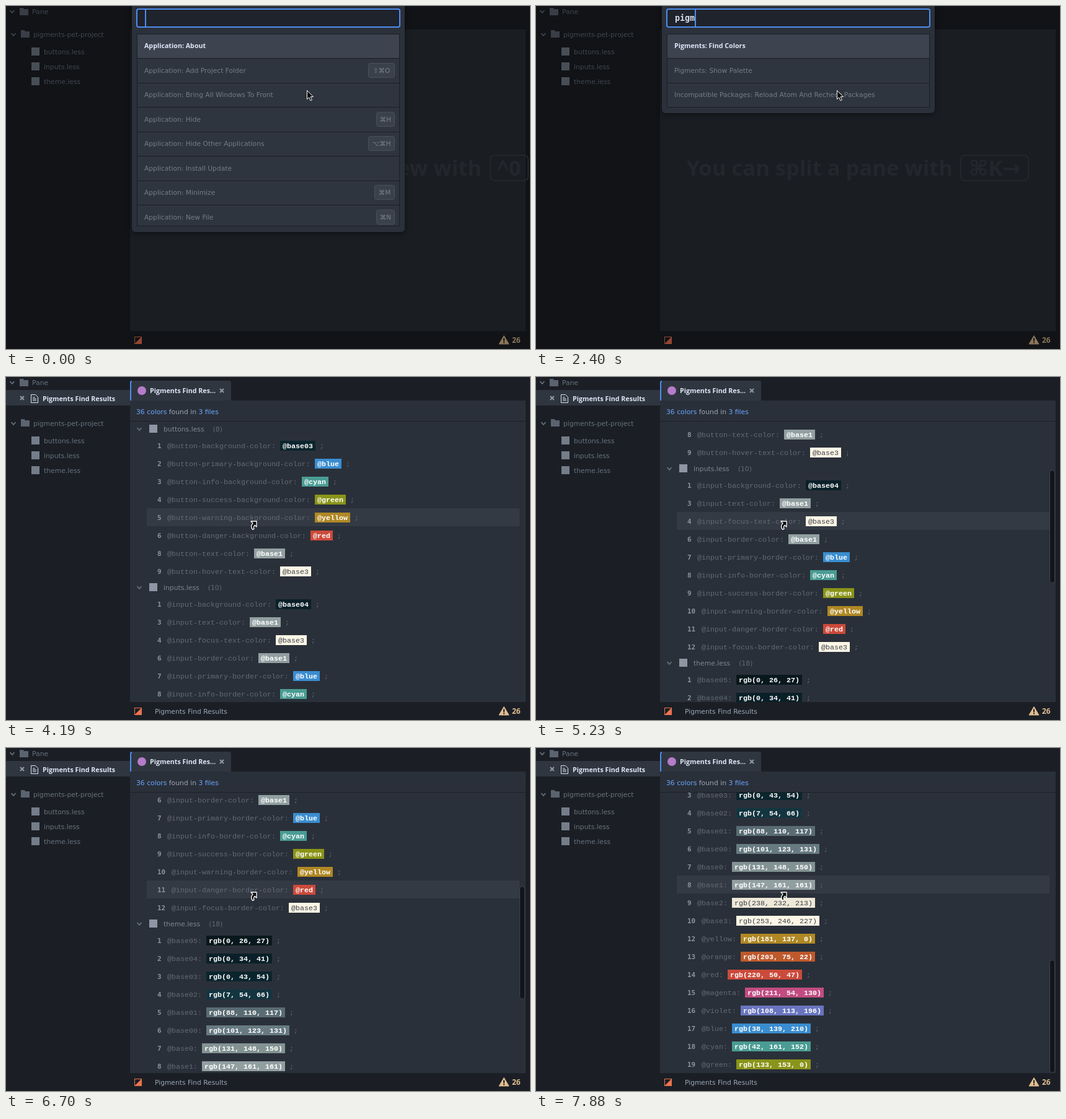
An HTML page for the animation above (8000 ms loop, 845 by 554 pixels).

```html
<!DOCTYPE html>
<html lang="en">
<head>
<meta charset="utf-8">
<title>Find colors</title>
<style>
  html, body { margin: 0; width: 100%; height: 100%; overflow: hidden; background: #1b1f25; }
  svg { display: block; width: 845px; height: 554px; }
  text { font: 10.8px "DejaVu Sans", sans-serif; fill: #68717e; white-space: pre; }
  .bold { font: 700 10.7px "Open Sans", sans-serif; fill: #dfe6f5; }
  .code { font: 11.67px "Liberation Mono", monospace; fill: #626a76; }
  .pill { font-weight: 700; }
  .num { font: 700 11px "DejaVu Sans Mono", monospace; fill: #8a93a0; }
  .link { fill: #6aa5ff; }
  .soft { fill: #9ba6b6; }
  .item { font-size: 10.7px; fill: #737c89; }
  .key { font-size: 10.5px; fill: #79828f; text-anchor: middle; }
  .query { font: 700 13.3px "DejaVu Sans Mono", monospace; fill: #d5dcea; }
  .tip { font: 700 34.5px "Open Sans", "DejaVu Sans", sans-serif; fill: #383e47; }
</style>
</head>
<body>
<svg id="stage" viewBox="0 0 845 554"></svg>
<script>
const LOOP = 8000;
const stage = document.getElementById('stage');

function add(parent, tag, attrs = {}, content) {
  const node = document.createElementNS('http://www.w3.org/2000/svg', tag);
  for (const key in attrs) node.setAttribute(key, attrs[key]);
  if (content !== undefined) node.textContent = content;
  parent.append(node);
  return node;
}
const group = (parent, attrs) => add(parent, 'g', attrs);
const rect = (parent, x, y, width, height, fill, more) =>
  add(parent, 'rect', { x, y, width, height, fill, ...more });
const text = (parent, x, y, content, cls = '', more) =>
  add(parent, 'text', { x, y, class: cls, ...more }, content);
const line = (parent, d, stroke, width = 1.5) =>
  add(parent, 'path', { d, stroke, 'stroke-width': width, fill: 'none' });
const show = (node, on) => node.setAttribute('display', on ? 'inline' : 'none');

function clip(id, x, y, w, h) {
  rect(add(stage, 'clipPath', { id }), x, y, w, h);
  return { 'clip-path': `url(#${id})` };
}
const chevron = (parent, x, y) =>
  line(parent, `M${x - 3.5} ${y - 2}l3.5 4 3.5-4`, '#68717e', 1.8);
const cross = (parent, x, y) =>
  line(parent, `M${x - 3} ${y - 3}l6 6m0-6l-6 6`, '#9199a5', 2);
const folder = (parent, x, y) =>
  add(parent, 'path', { d: `M${x} ${y - 6}h6l1 2h7v10h-14z`, fill: '#5b636f' });

// Window
rect(stage, 0, 0, 845, 554, '#1b1f25');
rect(stage, 200, 38, 638, 487, '#2a3039');

// Background tips
function tip(words, right, keyX, keyWidth, keys) {
  const g = group(stage);
  text(g, right, 274, words, 'tip', { 'text-anchor': 'end' });
  rect(g, keyX + 1, 241, keyWidth - 2, 41, 'none',
    { rx: 7, stroke: '#383e47', 'stroke-width': 2 });
  text(g, keyX + keyWidth / 2, 274, keys, 'tip', { 'text-anchor': 'middle' });
  return g;
}
const tipTree = tip('You can focus the tree view with', 767, 780, 63, '^0');
const tipSplit = tip('You can split a pane with', 672, 684, 111, '⌘K→');

// Sidebar
chevron(stage, 10, 9);
folder(stage, 22, 9);
text(stage, 42, 13, 'Pane');
const project = group(stage);
chevron(project, 12, 46);
folder(project, 24, 45);
text(project, 44, 50, 'pigments-pet-project');
['buttons', 'inputs', 'theme'].forEach((name, i) => {
  const y = 74 + 24 * i;
  rect(project, 41, y - 7, 13, 13, '#747d89');
  text(project, 61, y + 4, name + '.less');
});

// Status bar
rect(stage, 207.5, 534.5, 11, 11, 'none', { stroke: '#ee7350' });
add(stage, 'path', { d: 'M219 534v12h-12z', fill: '#ee7350' });
add(stage, 'path', { d: 'M803 532.5l8 13.5h-16z', fill: '#e0bd91', stroke: '#e0bd91', 'stroke-linejoin': 'round' });
line(stage, 'M803 536.5v5m0 1v2', '#1b1f25', 2);
text(stage, 816, 544, '26', 'bold', { style: 'fill:#e0bd91;font-size:12px' });

// Results pane
const pane = group(stage);
rect(pane, 0, 21, 200, 25, '#303640');
cross(pane, 26, 34);
line(pane, 'M40.5 28.5h7l4 4v9h-11z M43 33h4m-4 2.5h6m-6 2.5h6', '#dfe6f5', 1);
text(pane, 59, 39, 'Pigments Find Results', 'bold');
add(pane, 'path', { d: 'M200 38V9q0-3 3-3h157q3 0 3 3v29z', fill: '#303640' });
line(pane, 'M201 38V9q0-2 2-2', '#4d8df2', 2);
add(pane, 'circle', { cx: 219, cy: 22, r: 7, fill: '#b57cc9' });
text(pane, 232, 26, 'Pigments Find Res…', 'bold');
cross(pane, 348, 22);
rect(pane, 200, 38, 638, 487, '#2a3039');
const summary = text(pane, 210, 60, '');
[['36 colors', 'link'], [' found in ', 'soft'], ['3 files', 'link']]
  .forEach(([part, cls]) => add(summary, 'tspan', { class: cls }, part));
rect(pane, 200, 71, 638, 1, '#1b1f25');
text(pane, 240, 544, 'Pigments Find Results', 'soft', { style: 'font-size:10.7px' });

const colors = {
  base05: '#09181d', base04: '#0a2029', base03: '#0a252e', base02: '#133540',
  base01: '#5a6c73', base00: '#677a82', base0: '#839393', base1: '#929fa1',
  base2: '#eee8d8', base3: '#fdf6e6', yellow: '#b08824', orange: '#be592c',
  red: '#cc4a3b', magenta: '#c24c82', violet: '#6975bf', blue: '#3a8dd0',
  cyan: '#4a9c94', green: '#8a9419'
};
// Each row: line number, variable, value, color name
const statuses = suffix => ['primary blue', 'info cyan', 'success green', 'warning yellow', 'danger red']
  .map(pair => pair.split(' ')).map(([kind, color]) => [kind + suffix, color]);
const numbered = (lines, prefix, rows) =>
  rows.map(([name, color], i) => [lines[i], prefix + name, '@' + color, color]);
const themeValues = ['0, 26, 27', '0, 34, 41', '0, 43, 54', '7, 54, 66', '88, 110, 117',
  '101, 123, 131', '131, 148, 150', '147, 161, 161', '238, 232, 213', '253, 246, 227',
  '181, 137, 0', '203, 75, 22', '220, 50, 47', '211, 54, 130', '108, 113, 196',
  '38, 139, 210', '42, 161, 152', '133, 153, 0'];
const files = [
  ['buttons', 84, numbered([1, 2, 3, 4, 5, 6, 8, 9], 'button-', [
    ['background-color', 'base03'], ...statuses('-background-color'),
    ['text-color', 'base1'], ['hover-text-color', 'base3']])],
  ['inputs', 340, numbered([1, 3, 4, 6, 7, 8, 9, 10, 11, 12], 'input-', [
    ['background-color', 'base04'], ['text-color', 'base1'], ['focus-text-color', 'base3'],
    ['border-color', 'base1'], ...statuses('-border-color'), ['focus-border-color', 'base3']])],
  ['theme', 654, Object.keys(colors).map((name, i) =>
    [i < 10 ? i + 1 : i + 2, name, `rgb(${themeValues[i]})`, name])]
];

const view = group(pane, clip('view', 200, 72, 638, 453));
const results = group(view);
const hover = rect(results, 227, 0, 601, 29, '#343a44');
const rowCenters = [];
const CHAR = 7;

function resultRow(y, [number, name, value, color]) {
  rowCenters.push(y);
  const codeX = 253 + CHAR * String(number).length;
  const pillX = codeX + CHAR * (name.length + 3);
  const pillWidth = CHAR * value.length + 8;
  const light = color === 'base2' || color === 'base3';
  const baseline = y + 4;
  text(results, 244, baseline, number, 'num');
  text(results, codeX, baseline, `@${name}:`, 'code');
  rect(results, pillX, y - 8, pillWidth, 16, colors[color]);
  text(results, pillX + 4, baseline, value, light ? 'code' : 'code pill',
    { style: `fill:${light ? '#3b4048' : '#fff'}` });
  text(results, pillX + pillWidth + CHAR, baseline, ';', 'code');
}
for (const [name, y, rows] of files) {
  chevron(results, 215, y);
  rect(results, 231, y - 7, 13, 13, '#8d96a2');
  const title = text(results, 254, y + 4, name + '.less', '', { style: 'fill:#7d8692' });
  add(title, 'tspan', { dx: 14, fill: '#626a76' }, `(${rows.length})`);
  rows.forEach((row, i) => resultRow(y + 27 + 29 * i, row));
}
const thumb = rect(pane, 828.5, 72, 8, 182, '#12161b', { rx: 4, stroke: '#3d444e' });

// Command palette
const palette = group(stage);
rect(palette, 0, 0, 845, 554, '#000', { opacity: .38 });
const panel = rect(palette, 203, -10, 440, 375, '#2b313a',
  { rx: 6, style: 'filter:drop-shadow(0 2px 5px rgba(0,0,0,.5))' });
rect(palette, 211, 5, 424, 29, '#1f232b', { rx: 3, stroke: '#4d8df2', 'stroke-width': 2 });
const query = text(palette, 224, 24, '', 'query');
const caret = rect(palette, 224, 6, 2, 27, '#4d8df2');

function commandList(id, height, rows) {
  const g = group(palette, clip(id, 211, 45, 424, height));
  rows.forEach(([label, keys], i) => {
    const y = 45 + 39.5 * i, top = Math.floor(y), mid = Math.round(y + 19.4);
    rect(g, 211, top, 424, 40, i ? '#2f353f' : '#3d4450');
    rect(g, 211, top, 424, 1, '#1b1f25');
    text(g, 223, mid + 4, label, i ? 'item' : 'bold');
    if (!keys) return;
    const width = keys.length > 2 ? 43 : keys.endsWith('M') ? 33 : 30;
    rect(g, 627.5 - width, mid - 11.5, width - 1, 23, '#3a414b', { rx: 3, stroke: '#4a515c' });
    text(g, 627 - width / 2, mid + 4, keys, 'key');
  });
  rect(g, 211.5, 45.5, 423, height - 1, 'none', { stroke: '#1b1f25' });
  return { g, bottom: 54 + height };
}
const pigments = [['Pigments: Find Colors'], ['Pigments: Show Palette']];
const application = (label, keys) => ['Application: ' + label, keys];
const lists = {
  all: commandList('all', 311, [
    application('About'),
    application('Add Project Folder', '⇧⌘O'),
    application('Bring All Windows To Front'),
    application('Hide', '⌘H'),
    application('Hide Other Applications', '⌥⌘H'),
    application('Install Update'),
    application('Minimize', '⌘M'),
    application('New File', '⌘N')]),
  some: commandList('some', 311, [
    ...pigments,
    application('Add Project Folder', '⇧⌘O'),
    application('Bring All Windows To Front'),
    application('Hide', '⌘H'),
    application('Hide Other Applications', '⌥⌘H'),
    application('Install Update'),
    application('Minimize', '⌘M')]),
  few: commandList('few', 119, [
    ...pigments, ['Incompatible Packages: Reload Atom And Recheck Packages']])
};

// Pointers
const outline = { fill: '#000', stroke: '#fff', 'stroke-linejoin': 'round' };
const arrow = add(stage, 'path',
  { ...outline, d: 'M.5 .5v14l3.2-3 2.3 5.3 2.4-1-2.3-5.2h4.4z' });
const alias = add(stage, 'path', { ...outline, 'stroke-width': 1.3,
  d: 'M395 233h9v9l-2.8-2.8q-3 2.5-1.2 6.2l-2.4 1q-4.2-5.5 .6-10z' });

// Time tables: [start, ...values]
const typing = [[0, '', 'all', 1], [300, '', 'all', 0], [600, '', 'all', 1], [900, 'p', 'all', 1],
  [1050, 'pi', 'some', 1], [1200, 'pig', 'some', 1], [1350, 'pig', 'few', 1],
  [1500, 'pigm', 'few', 1], [1950, 'pigm', 'few', 0], [2400, 'pigm', 'few', 1]];
const pointer = [[0, 485, 136], [3750, 474, 149], [3900, 440, 186], [4050, 408, 219]];
const scrolling = [[0, 0], [4780, 60], [4930, 130], [5080, 180], [5230, 192], [5380, 216],
  [5530, 245], [5680, 264], [5820, 272], [5970, 276], [6120, 286], [6270, 302], [6410, 325],
  [6550, 354], [6700, 370], [6850, 400], [6990, 446], [7140, 504], [7290, 562], [7440, 612],
  [7580, 641], [7730, 657], [7880, 663]];
const stepAt = (table, t) => table.findLastIndex(row => row[0] <= t);
const ramp = (t, from, to) => Math.min(1, Math.max(0, (t - from) / (to - from)));

function render(t) {
  const [, typed, listName, caretOn] = typing[stepAt(typing, t)];
  query.textContent = typed;
  caret.setAttribute('x', 224 + 8 * typed.length);
  show(caret, caretOn);
  for (const name in lists) show(lists[name].g, name === listName);
  panel.setAttribute('height', lists[listName].bottom + 10);
  show(palette, t < 2700);

  tipTree.setAttribute('opacity', 1 - ramp(t, 900, 1400));
  tipSplit.setAttribute('opacity', ramp(t, 1400, 1950));
  const open = t >= 2850;
  show(pane, open);
  show(view, t >= 3000);
  project.setAttribute('transform', `translate(0 ${open ? 29 : 0})`);

  const [, px, py] = pointer[stepAt(pointer, t)];
  arrow.setAttribute('transform', `translate(${px} ${py})`);
  show(arrow, t < 4190);
  show(alias, t >= 4190);

  // The hovered row trails the scroll by one step
  const step = stepAt(scrolling, t);
  const scroll = scrolling[step][1];
  const target = (t < 4190 ? py : 232) + scrolling[Math.max(0, step - 1)][1];
  const row = rowCenters.find(y => Math.abs(y - target) <= 14.5);
  show(hover, t >= 3750 && row !== undefined);
  if (row !== undefined) hover.setAttribute('y', row - 15);
  results.setAttribute('transform', `translate(0 ${-scroll})`);
  thumb.setAttribute('y', 72.5 + Math.round(scroll * .407));
  show(thumb, t >= 4780);
}

const start = performance.now();
function tick() {
  render((performance.now() - start) % LOOP);
  requestAnimationFrame(tick);
}
tick();
</script>
</body>
</html>
```
